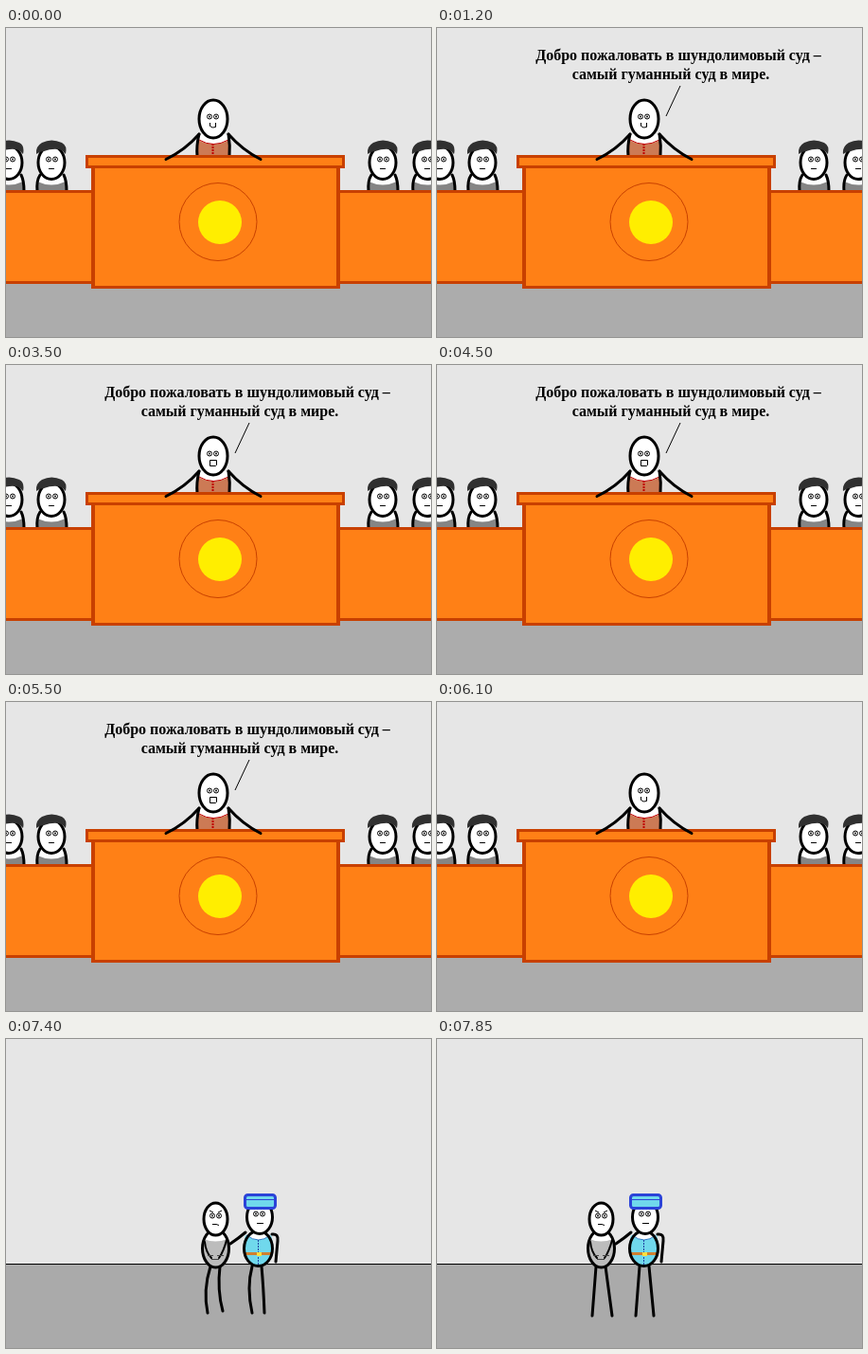
An HTML page for the animation above (8 s loop, 449 px wide and 326 px high).

```html
<!DOCTYPE html>
<html lang="ru">
<head>
<meta charset="utf-8">
<style>
html, body { margin: 0; width: 100%; height: 100%; overflow: hidden; }
svg { display: block; width: 449px; height: 326px; background: #e6e6e6; }
.ink { stroke: #000; stroke-width: 3; fill: none; stroke-linecap: round; }
.skin { fill: #fff; }
.thin { stroke: #000; stroke-width: 1; fill: none; }
.wood { fill: #ff8016; stroke: #c84000; stroke-width: 3; }
text { font: bold 16px "Liberation Serif", "Times New Roman", serif; text-anchor: middle; }
</style>
</head>
<body>
<svg viewBox="0 0 449 326">
  <defs>
    <g id="eye">
      <circle class="thin" r="2.5" style="fill:#fff"/><circle r="1"/>
    </g>
    <g id="eyes">
      <use href="#eye" x="-3.5"/><use href="#eye" x="3.5"/>
    </g>
    <g id="juror">
      <path class="skin" d="M-12 13Q-16 19-15 30H16Q16 19 13 13Z"/>
      <path fill="#858585" d="M-15 20Q0 27 15 20L16 30H-15Z"/>
      <path class="ink" d="M-12 13Q-16 19-15 30M13 13Q16 19 16 30"/>
      <ellipse class="ink skin" rx="14" ry="17.5"/>
      <path fill="#303030" d="M-16-9Q-17-17-10-21Q0-26 11-21Q17-18 15-9Q12-13 8-14Q0-15-8-12Q-12-12-16-9Z"/>
      <use href="#eyes" x=".5" y="-3.5"/>
      <path class="thin" d="M-3 6.5h6"/>
    </g>
  </defs>

  <g id="court">
    <path fill="#acacac" d="M0 269h449v57H0z"/>
    <use href="#juror" x="3" y="142"/><use href="#juror" x="48" y="142"/>
    <use href="#juror" x="398" y="142"/><use href="#juror" x="445" y="142"/>

    <path class="skin" d="M205 112Q201 124 202 136H237Q237 122 235 112Z"/>
    <path fill="#cc7a55" d="M203 118Q219 127 236 118L237 136H202Z"/>
    <path fill="none" stroke="#c00000" d="M204 118Q219 127 235 118"/>
    <path fill="none" stroke="#c00000" stroke-width="2" stroke-dasharray="2 1" d="M218.5 122v13"/>
    <path class="ink" stroke-width="2.5" d="M204 112Q201 124 202 135M235 112Q237 124 236 135"/>
    <ellipse class="ink skin" cx="219" cy="96" rx="15" ry="20"/>
    <use href="#eyes" x="218.5" y="93.5"/>
    <path id="mouth" class="thin"/>

    <path class="wood" d="M-5 172.5H92V268.5H-5zM351 172.5H455V268.5H351z"/>
    <path class="wood" d="M91.5 146.5H351.5V273.5H91.5zM85.5 135.5H356.5V146.5H85.5z"/>
    <path class="wood" style="stroke-width:4" d="M92 148V273M351 148V273"/>
    <path class="ink" d="M204 112Q189 129 169 138.5M235 112Q250 129 269 138.5"/>
    <circle cx="224" cy="204.5" r="41" fill="none" stroke="#c84000"/>
    <circle cx="226" cy="205" r="23" fill="#ffee00"/>

    <g id="speech">
      <text x="255" y="34">Добро пожаловать в шундолимовый суд –</text>
      <text x="247" y="54">самый гуманный суд в мире.</text>
      <path class="thin" d="M257 61L242 93"/>
    </g>
  </g>

  <g id="hall">
    <path fill="#aaa" d="M0 237h449v89H0z"/>
    <path class="thin" d="M0 237.5h449"/>
    <g id="walkers">
      <path id="legs" class="ink"/>
      <!-- prisoner -->
      <ellipse class="skin" cx="270.5" cy="221" rx="14" ry="20"/>
      <path fill="#bcbcbc" d="M258 211Q270 216 283 211Q287 223 280 234Q270 247 260 234Q254 222 258 211Z"/>
      <ellipse class="ink" cx="270.5" cy="221" rx="14" ry="20"/>
      <path class="ink" d="M259 214Q260 225 266 231M282 212Q279 224 274 231" style="stroke-width:2"/>
      <path stroke="#444" d="M262 228.5h6M266 232.5h8M272 228.5h7"/>
      <ellipse class="ink skin" cx="270.5" cy="190" rx="12.5" ry="17"/>
      <use href="#eyes" x="270.5" y="186.5"/>
      <path class="thin" d="M264 181l4 2M273 183l4-2M267 195.5h4l3 1"/>
      <!-- guard -->
      <path class="ink" d="M302 204Q295 210 286 216M330 206Q337 205 336 213L334 235"/>
      <ellipse class="skin" cx="315.5" cy="221" rx="15" ry="18.5"/>
      <path fill="#70d8ec" d="M302 207Q316 217 329 207Q334 223 325 235Q315 244 306 235Q297 222 302 207Z"/>
      <path fill="none" stroke="#2878c8" d="M303 207Q316 217 328 207"/>
      <path stroke="#2040a0" stroke-dasharray="2 1" d="M315.5 212v26"/>
      <path stroke="#d08030" stroke-width="3" d="M302 226.5h27"/>
      <path fill="#ffe040" d="M314 225h5v4h-5z"/>
      <ellipse class="ink" cx="315.5" cy="221" rx="15" ry="18.5"/>
      <ellipse class="ink skin" cx="317" cy="188" rx="13.5" ry="17.5"/>
      <use href="#eyes" x="316.5" y="184.5"/>
      <path class="thin" d="M314 194.5h7"/>
      <rect x="301.5" y="164.5" width="32" height="14" rx="3" fill="#70d8ec" stroke="#2b43d8" stroke-width="3"/>
      <path stroke="#2b43d8" d="M303 169.5h29"/>
    </g>
  </g>
</svg>
<script>
const el = id => document.getElementById(id);
const court = el('court'), hall = el('hall'), speech = el('speech');
const mouth = el('mouth'), legs = el('legs'), walkers = el('walkers');

const smile = 'M215.5 100V103.5Q218 106 221.5 104.5V100';
const talk = [4, 2, 5, 3, 6].map(h => `M215.5 ${106.5 - h}H222.5V105.5L221.5 106.5H215.5Z`);

const bent = 'M265 240Q258 262 263 288M277 240Q276 265 282 287M309 240Q307 262 309 285M323 240Q321 265 328 285';
const passing = 'M265 240Q257 265 262 289M275 240Q272 265 278 287M309 240Q303 262 309 289M319 240Q321 262 322 289';
const stride = 'M265 240L261 292M275 240L282 292M311 240L307 292M321 240L326 292';
const gait = [bent, stride, passing, stride, bent, stride];
const shift = [0, -25, -49, -65, -81, -97];

function draw(t) {
  const walking = t >= 7100;
  court.style.display = walking ? 'none' : '';
  hall.style.display = walking ? '' : 'none';
  if (walking) {
    const step = Math.min(5, Math.floor((t - 7100) / 150));
    legs.setAttribute('d', gait[step]);
    walkers.setAttribute('transform', `translate(${shift[step]})`);
    return;
  }
  const talking = t >= 1700 && t < 6100;
  mouth.setAttribute('d', talking ? talk[Math.floor((t - 1700) / 200) % 5] : smile);
  mouth.style.fill = talking ? '#fff' : 'none';
  speech.style.opacity = t < 1000 || t >= 6100 ? 0 : t < 1200 || t >= 5900 ? 0.5 : 1;
}

const start = performance.now();
function tick() {
  draw((performance.now() - start) % 8000);
  requestAnimationFrame(tick);
}
tick();
</script>
</body>
</html>
```
